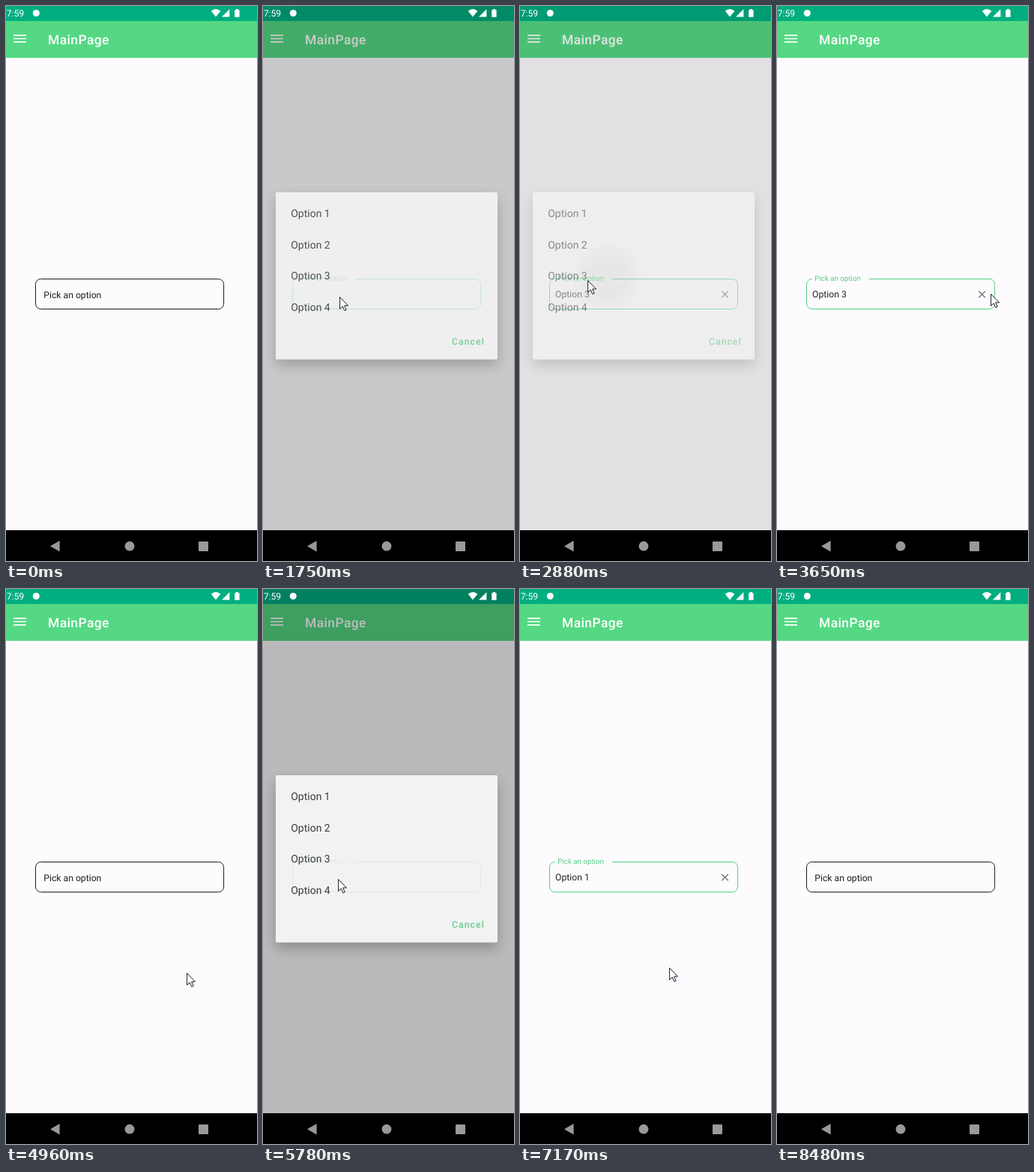
Write an HTML page that moves like this. It is 335 px wide and 739 px high and loops after 9210 ms.

```html
<!DOCTYPE html>
<html lang="en">
<head>
<meta charset="utf-8">
<title>Option picker</title>
<style>
  html, body { margin: 0; width: 100%; height: 100%; overflow: hidden; background: #000; }
  svg { display: block; width: 335px; height: 739px; font-family: Roboto, sans-serif; text-rendering: geometricPrecision; }
</style>
</head>
<body>
<svg viewBox="0 0 335 739">
  <defs>
    <radialGradient id="ink">
      <stop offset=".55" stop-color="#000" stop-opacity=".055"/>
      <stop offset="1" stop-color="#000" stop-opacity="0"/>
    </radialGradient>
    <filter id="shadow" x="-15%" y="-20%" width="130%" height="145%">
      <feDropShadow dx="0" dy="8" stdDeviation="9" flood-color="#000" flood-opacity=".3"/>
    </filter>
  </defs>

  <rect width="335" height="698" fill="#fdfbfe"/>
  <rect width="335" height="20" fill="#00ae80"/>
  <rect y="20" width="335" height="49" fill="#54d883"/>
  <path d="M10 39.1H27M10 43.5H27M10 47.9H27" stroke="#fff" stroke-width="1.7"/>
  <text x="56" y="51" font-size="17.45" font-weight="500" letter-spacing=".4" fill="#fff">MainPage</text>

  <path id="outline" fill="none"/>
  <text id="label" font-size="12.2">Pick an option</text>
  <g id="filled">
    <text id="value" x="47" y="388.3" font-size="12.2" fill="#222"></text>
    <path d="M269.3 379.7l8.6 8.6m0-8.6l-8.6 8.6" stroke="#757575" stroke-width="1.4"/>
  </g>

  <rect id="dim" width="335" height="698"/>

  <g id="dialog">
    <rect x="17" y="248" width="296" height="222.5" rx="2" fill="#fff" filter="url(#shadow)"/>
    <circle id="ripple" cy="362" fill="url(#ink)"/>
    <g id="options" font-size="14" fill="#212121"></g>
    <text x="252" y="451" font-size="12.2" font-weight="500" letter-spacing="1.09" fill="#54d083">Cancel</text>
  </g>

  <g fill="#fff">
    <text x=".7" y="14.2" font-size="12.2">7:59</text>
    <circle cx="40.3" cy="9.5" r="4.5"/>
    <path d="M280 14.6L273.8 6.8Q280 1.2 286.4 6.8Z"/>
    <path d="M288 14.6L298.4 4.2V14.6Z"/>
    <path d="M305.2 5.2h1.8V4h2.8v1.2h1.8v9.6h-6.4Z"/>
  </g>

  <rect y="698" width="335" height="41"/>
  <g fill="#999">
    <path d="M59 719.2L71.6 712V726.4Z"/>
    <circle cx="165" cy="719.2" r="6.4"/>
    <rect x="257" y="713" width="13" height="13" rx="1"/>
  </g>

  <g id="cursor">
    <path d="M.6 .6V16.4L4.3 12.9L6.8 18.6L9.2 17.6L6.7 11.9H11.5Z" fill="#fff" stroke="#1b1b24"/>
    <circle id="click" r="12" fill="#ff0" fill-opacity=".47"/>
  </g>
</svg>
<script>
const LOOP = 9210;
const GREEN = '#50d083';
const INK = '#1c1c1c';
const $ = id => document.getElementById(id);
const set = (id, attrs) => {
  for (const name in attrs) $(id).setAttribute(name, attrs[name]);
};
const show = (id, on) => set(id, { visibility: on ? 'visible' : 'hidden' });
const lerp = (a, b, p) => a + (b - a) * p;
const progress = (t, start, length) => Math.max(0, Math.min(1, (t - start) / length));

// One visit per picked option: field focused, dialog closed, value cleared
const visits = [
  { focus: 1607, close: 2740, clear: 4270, option: 'Option 3' },
  { focus: 5618, close: 6815, clear: 8210, option: 'Option 1' }];

// Places the pointer stops at
const entry = [299, 711], field = [102, 387], third = [90, 365], edge = [285, 383];
const cross = [276, 384], first = [89, 283], exit = [335, 590];

// Pointer moves, each a curve bent towards `via`
const moves = [
  { from: 460, to: 1270, a: entry, via: [160, 430], b: field },
  { from: 2180, to: 2350, a: field, via: [96, 376], b: third },
  { from: 3130, to: 3650, a: third, via: [190, 460], b: edge },
  { from: 3650, to: 3930, a: edge, via: edge, b: cross },
  { from: 4270, to: 5400, a: cross, via: [340, 650], b: [100, 386] },
  { from: 6000, to: 6400, a: [100, 386], via: [95, 330], b: first },
  { from: 6820, to: 7930, a: first, via: [300, 770], b: cross },
  { from: 8210, to: 8450, a: cross, via: [300, 440], b: exit }];
const enterTime = moves[0].from, exitTime = moves[moves.length - 1].to;

for (let i = 0; i < 4; i++) {
  $('options').innerHTML += `<text x="37.2" y="${280.8 + i * 41.8}">Option ${i + 1}</text>`;
}

function drawField(t, { focus, close, clear, option }) {
  const focused = t >= focus && t < clear;
  const color = focused ? GREEN : INK;
  const lift = progress(t, focus, 130) - progress(t, clear, 130);
  const start = lift > 0 ? 122.5 : 46.5;
  set('outline', {
    d: `M${start} 363.5H283.6a7 7 0 0 1 7 7V396.5a7 7 0 0 1-7 7H46.5a7 7 0 0 1-7-7V370.5a7 7 0 0 1 7-7`,
    stroke: color
  });
  set('label', {
    transform: `translate(50.3 ${lerp(388.8, 366, lift)}) scale(${lerp(1, 0.8, lift)})`,
    fill: color
  });
  show('filled', t >= close && t < clear);
  $('value').textContent = option;
}

function drawDialog(t, { focus, close }) {
  const p = progress(t, focus + 80, 190) - progress(t, close + 10, 160);
  set('dim', { opacity: 0.6 * p });
  set('dialog', { opacity: 1 - (1 - p) ** 3 });
  show('dialog', p > 0);
  const [{ close: tap }] = visits;
  const spread = progress(t, tap, 210);
  set('ripple', { cx: lerp(100, 125, spread), r: lerp(23, 60, spread) });
  show('ripple', p > 0 && t >= tap && spread < 1);
}

function drawPointer(t, { focus, close, clear }) {
  const { from, to, a, via, b } = moves.filter(move => move.from <= t).pop() || moves[0];
  const p = progress(t, from, to - from);
  const [x, y] = a.map((v, i) => Math.round(lerp(lerp(v, via[i], p), lerp(via[i], b[i], p), p)));
  set('cursor', { transform: `translate(${x} ${y})` });
  $('cursor').style.display = t >= enterTime && t < exitTime ? '' : 'none';
  const pressed = (end, length) => t >= end - length && t < end;
  show('click', pressed(focus, 140) || pressed(close, 200) || pressed(clear, 140));
}

function draw(t) {
  const visit = visits[t < 5100 ? 0 : 1];
  drawField(t, visit);
  drawDialog(t, visit);
  drawPointer(t, visit);
}

const begin = performance.now();
function tick() {
  draw((performance.now() - begin) % LOOP);
  requestAnimationFrame(tick);
}
tick();
</script>
</body>
</html>
```
